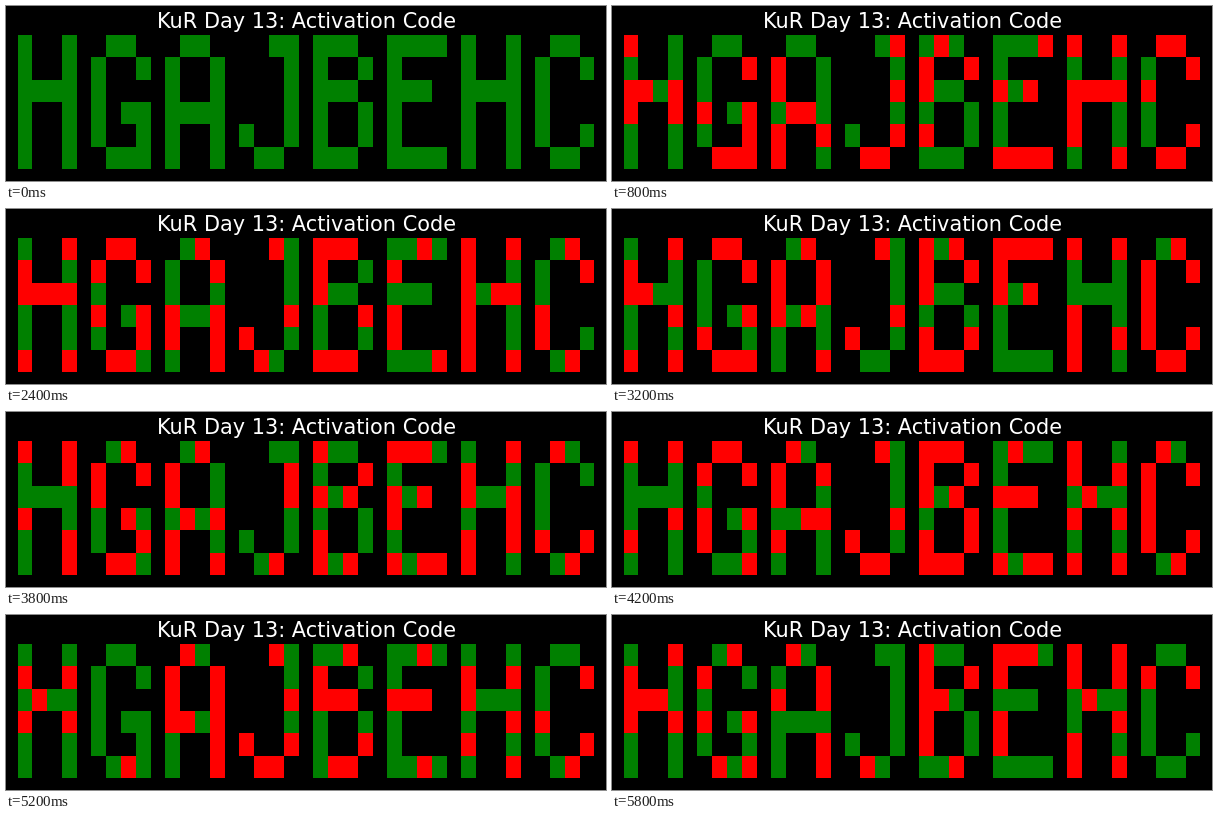
Animation, 600 px wide and 175 px high, one loop 6000 ms. Source, as an HTML page with a canvas:

```html
<!DOCTYPE html>
<html lang="en">
<head>
<meta charset="utf-8">
<title>Activation Code</title>
<style>
html, body { margin: 0; width: 600px; height: 175px; overflow: hidden; background: #000; }
canvas { display: block; }
</style>
</head>
<body>
<canvas id="stage" width="600" height="175"></canvas>
<script>
const STEP = 200, STEPS = 30;
const LEFT = 11.5, CELL_W = 14.7945, TOP = 29, CELL_H = 22.35;
const ROWS = [
  '#..# .##. .##. ..## ###. #### #..# .##.',
  '#..# #..# #..# ...# #..# #... #..# #..#',
  '#### #... #..# ...# ###. ###. #### #...',
  '#..# #.## #### ...# #..# #... #..# #...',
  '#..# #..# #..# #..# #..# #... #..# #..#',
  '#..# .### #..# .##. ###. #### #..# .##.'
];

const ctx = document.getElementById('stage').getContext('2d');
const start = performance.now();
const edgeX = col => Math.round(LEFT + col * CELL_W);
const edgeY = row => Math.round(TOP + row * CELL_H);

// Seeded generator (mulberry32)
function randomFrom(seed) {
  return () => {
    seed = seed + 0x6D2B79F5 | 0;
    let t = Math.imul(seed ^ seed >>> 15, 1 | seed);
    t = t + Math.imul(t ^ t >>> 7, 61 | t) ^ t;
    return ((t ^ t >>> 14) >>> 0) / 4294967296;
  };
}

function draw(step) {
  ctx.fillStyle = '#000';
  ctx.fillRect(0, 0, 600, 175);

  ctx.fillStyle = '#fff';
  ctx.font = '20.83px "DejaVu Sans", sans-serif';
  ctx.textAlign = 'center';
  ctx.fillText('KuR Day 13: Activation Code', 300.5, 22);

  // The loop opens all green, then every lit cell flips a coin at each step
  const random = randomFrom(step * 7919);
  ROWS.forEach((row, r) => {
    [...row].forEach((mark, c) => {
      if (mark !== '#') return;
      ctx.fillStyle = step && random() < 0.5 ? '#f00' : '#008000';
      const x = edgeX(c), y = edgeY(r);
      ctx.fillRect(x, y, edgeX(c + 1) - x, edgeY(r + 1) - y);
    });
  });
}

function tick() {
  draw(Math.floor((performance.now() - start) / STEP) % STEPS);
  requestAnimationFrame(tick);
}
tick();
</script>
</body>
</html>
```
